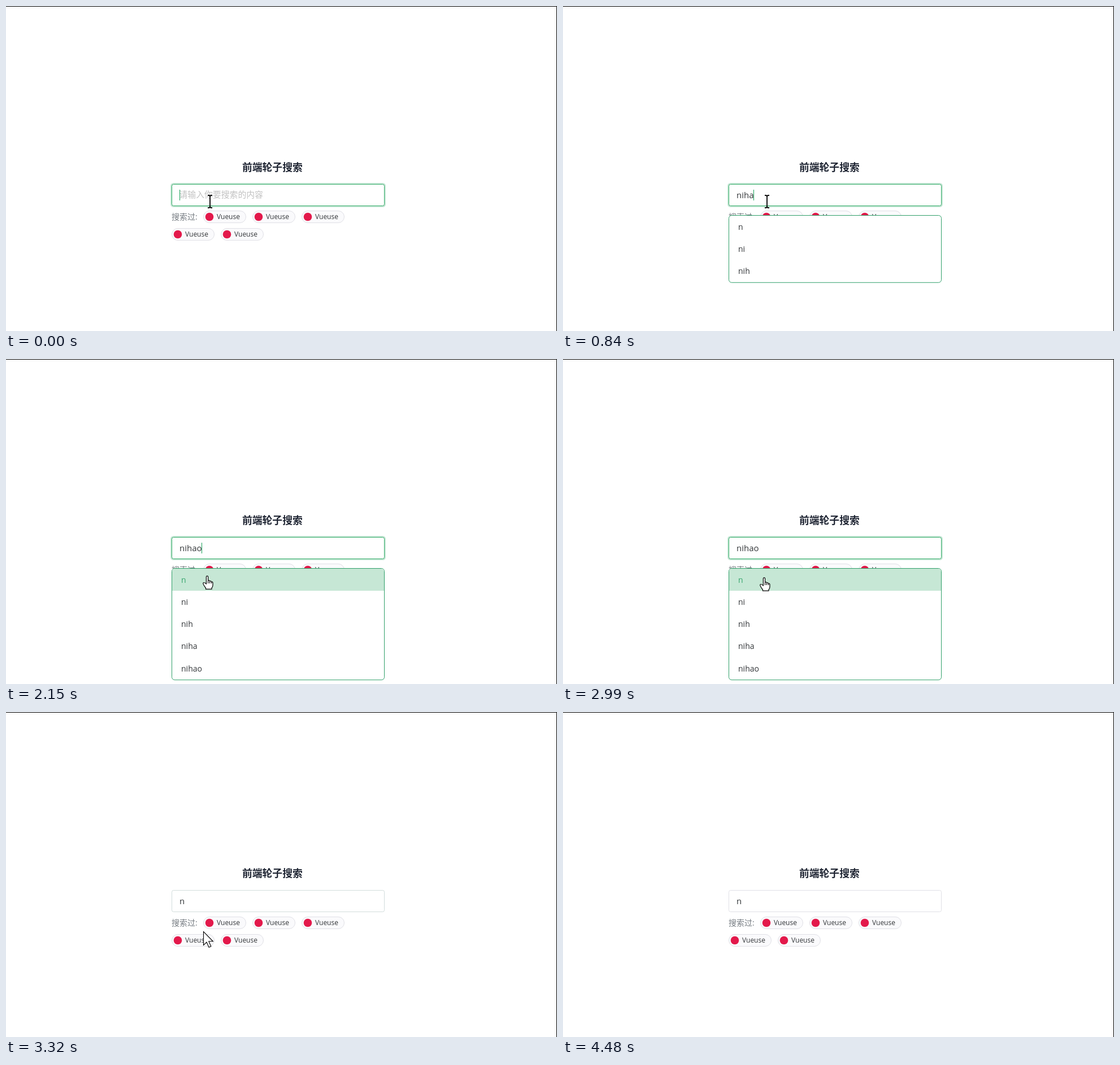
Animation, 975 px wide and 575 px high, one loop 4630 ms. Source, as an HTML page:

```html
<!DOCTYPE html>
<html lang="zh-CN">
<head>
<meta charset="utf-8">
<style>
  html, body { margin: 0; width: 100%; height: 100%; overflow: hidden; background: #fff; }
  svg { display: block; }
  text { font-family: "Open Sans", "Noto Sans CJK SC", "Noto Sans CJK", sans-serif; fill: #333639; white-space: pre; }
</style>
</head>
<body>
<svg width="975" height="575" viewBox="0 0 975 575">
  <defs>
    <g id="chip">
      <rect width="75" height="21" rx="10.5" fill="#fafafc" stroke="#e0e0e6"/>
      <circle cx="10.5" cy="10.5" r="7.3" fill="#e3194b"/>
      <text x="23.5" y="14.8" font-size="12">Vueuse</text>
    </g>
    <clipPath id="panelClip"><rect x="294" y="371" width="375" height="204" rx="4"/></clipPath>
  </defs>

  <text x="418" y="292.2" font-size="17.8" font-weight="700" style="fill:#1f2533">前端轮子搜索</text>

  <rect id="glow" x="292.5" y="314.5" width="378" height="40" rx="4" fill="none" stroke="#18a058" stroke-opacity=".25" stroke-width="3"/>
  <rect x="293.5" y="315.5" width="376" height="38" rx="3" fill="#fff" stroke="#e0e0e6"/>
  <rect id="tint" x="293.5" y="315.5" width="376" height="38" rx="3" fill="none" stroke="#36ad6a"/>
  <text id="hint" x="306.5" y="339" font-size="14.85" style="fill:#c2c2c2">请输入你要搜索的内容</text>
  <text id="value" x="307" y="340" font-size="15"></text>
  <rect id="caret" y="325" width="1" height="19" fill="#18a058"/>

  <text x="293" y="378.3" font-size="14" style="fill:#767c82">搜索过:</text>
  <use href="#chip" x="349.5" y="362.5"/>
  <use href="#chip" x="436.5" y="362.5"/>
  <use href="#chip" x="523.5" y="362.5"/>
  <use href="#chip" x="293.5" y="393.5"/>
  <use href="#chip" x="380.5" y="393.5"/>

  <g id="panel">
    <rect id="frame" x="293.5" y="370.5" width="376" rx="5" fill="#fff" stroke="#2f9f69"/>
    <rect id="hover" x="294" y="371" width="375" height="39" fill="#c6e7d5" clip-path="url(#panelClip)"/>
    <g id="rows"></g>
  </g>

  <path d="M0 .5H974.5V575" fill="none" stroke="#000"/>

  <path id="beam" d="M-4 -10H-1.5L0 -8.5L1.5 -10H4M0 -8.5V10.5M-4 12H-1.5L0 10.5L1.5 12H4" fill="none" stroke="#000" stroke-width="1.8"/>
  <g id="hand" fill="#fff" stroke="#000" stroke-width="1.2" stroke-linejoin="round">
    <path d="M-1.6 14V1.5a1.6 1.6 0 0 1 3.2 0V8q2.6-1 3 1q2.6-.7 3 1.2q2.4-.4 2.4 2V16q0 3-2 5v2.2H-2.5V21q-2-2-4.3-6.5q-1-3 1-3q1.8 0 4.2 2.5Z"/>
    <path d="M1.6 8V13M4.6 9V13M7.6 10.2V13"/>
  </g>
  <path id="arrow" d="M.5 .5V24.5L6 19.3L10 28.3L13.8 26.7L9.8 17.8H17.3Z" fill="#fff" stroke="#000" stroke-width="1.1"/>
</svg>

<script>
const LOOP = 4630, ROW = 39.25, WORD = 'nihao';
const KEYS = [330, 490, 640, 790, 935];     // when each letter is typed
const LISTED = [440, 590, 740, 890, 1030];  // when each suggestion appears
const BLUR = 2990, PICK = 3080, CLOSED = 3240, BLINK = 530;
// time, x, y of the pointer tip
const PATH = [[1970, 361, 345], [2150, 356, 384], [2330, 356, 387], [2990, 356, 387], [3280, 349, 388], [3640, 349, 388]];

const $ = id => document.getElementById(id);
const show = (id, on) => $(id).style.display = on ? '' : 'none';
const clamp = v => Math.max(0, Math.min(1, v));
const ramp = (t, from, to) => clamp((t - from) / (to - from));
const countPast = (times, t) => times.filter(at => t >= at).length;

const rows = [...WORD].map((_, i) => {
  const row = document.createElementNS('http://www.w3.org/2000/svg', 'text');
  row.setAttribute('x', 310);
  row.setAttribute('y', 395.5 + i * ROW);
  row.setAttribute('font-size', 14);
  row.textContent = WORD.slice(0, i + 1);
  return $('rows').appendChild(row);
});

function pointer(t) {
  if (t > 3640) {
    const k = ramp(t, 3640, 3970) ** 1.7;
    return [349 + 560 * k, 388 + 200 * k];
  }
  let [, x, y] = PATH[0];
  for (let i = 1; i < PATH.length; i++) {
    const [t0, x0, y0] = PATH[i - 1], [t1, x1, y1] = PATH[i], k = ramp(t, t0, t1);
    if (t >= t0) [x, y] = [x0 + (x1 - x0) * k, y0 + (y1 - y0) * k];
  }
  return [x, y];
}

function draw(t) {
  const typed = t >= PICK ? 1 : countPast(KEYS, t);
  $('value').textContent = WORD.slice(0, typed);
  show('hint', !typed);

  const idle = t - KEYS[4];
  show('caret', t < BLUR && (idle < 0 || Math.floor(idle / BLINK) % 2 === 0));
  $('caret').setAttribute('x', Math.round(307 + (typed ? $('value').getComputedTextLength() - .5 : 0)));

  const focus = 1 - ramp(t, BLUR + 20, 3310);
  $('glow').style.opacity = focus;
  $('tint').style.opacity = Math.max(focus, t < 4480 ? .08 : 0);

  const listed = countPast(LISTED, t);
  show('panel', listed && t < CLOSED);
  $('panel').style.opacity = ramp(t, 400, 490) * (1 - ramp(t, PICK, CLOSED));
  $('frame').setAttribute('height', listed * ROW + 1);
  rows.forEach((row, i) => row.style.display = i < listed ? '' : 'none');

  const [x, y] = pointer(t);
  const over = y > 370 && t < CLOSED;
  show('hover', over);
  rows[0].style.fill = over ? '#36a56d' : '';

  const shape = over ? 'hand' : y < 354 ? 'beam' : 'arrow';
  for (const id of ['beam', 'hand', 'arrow']) show(id, id === shape && t < 3970);
  $(shape).setAttribute('transform', `translate(${x} ${y})`);
}

function tick() {
  draw(performance.now() % LOOP);
  requestAnimationFrame(tick);
}
tick();
</script>
</body>
</html>
```
